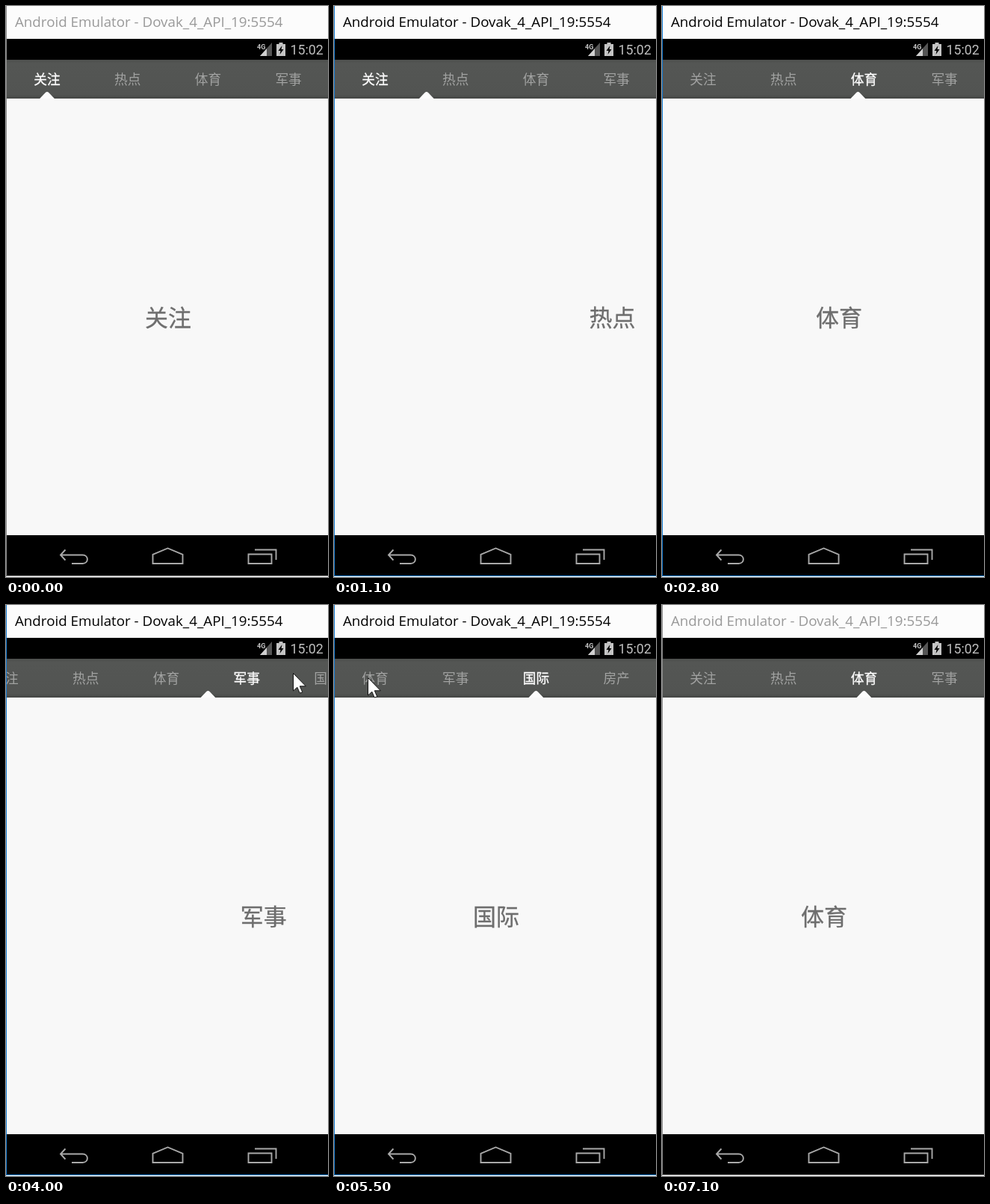
Animation, 431 px wide and 765 px high, one loop 7.2 s. Source, as an HTML page:

```html
<!DOCTYPE html>
<html lang="zh-CN">
<head>
<meta charset="utf-8">
<title>Tab pager</title>
<style>
  html, body { margin: 0; width: 100%; height: 100%; overflow: hidden; background: #f8f8f8; }
  svg { display: block; width: 431px; height: 765px; }
  #title { font: 18.75px "Open Sans", sans-serif; }
  #clock { font: 17.8px Roboto, sans-serif; fill: #bebebe; }
  #network { font: bold 9px Roboto, sans-serif; fill: #c4c4c4; }
  #pages, #tabs {
    font-family: "Noto Sans CJK SC", "Noto Sans CJK", sans-serif;
    text-anchor: middle; stroke-width: .3;
  }
  #pages { font-size: 31px; fill: #6e6e6e; stroke: #6e6e6e; }
  #tabs { font-size: 17.7px; fill: #a1a2a1; }
  #tabs .selected { fill: #fff; stroke: #fff; }
  #nav { fill: none; stroke: #a9a9a9; stroke-width: 1.9; }
</style>
</head>
<body>
<svg viewBox="0 0 431 765">
  <defs>
    <linearGradient id="barFill" x2="0" y2="1">
      <stop offset="0" stop-color="#4d4f4d"/>
      <stop offset=".1" stop-color="#545654"/>
      <stop offset=".9" stop-color="#525452"/>
      <stop offset="1" stop-color="#444644"/>
    </linearGradient>
  </defs>
  <rect width="431" height="765" fill="#f8f8f8"/>
  <rect width="431" height="44" fill="#fcfcfc"/>
  <text id="title" x="12" y="28">Android Emulator - Dovak_4_API_19:5554</text>

  <rect y="44" width="431" height="28"/>
  <path d="M340 67L356 49V67Z" fill="#555"/>
  <path d="M340 67L349 57V67Z" fill="#d0d0d0"/>
  <text id="network" x="336" y="57.500">4G</text>
  <path d="M365.500 49H370.500V51H374V67H362V51H365.500Z" fill="#c4c4c4"/>
  <path d="M369.500 53L364.500 60H367.500L366.500 65L371.500 58H368.500Z"/>
  <text id="clock" x="380.500" y="65">15:02</text>

  <g id="pages"></g>
  <rect y="72" width="431" height="52" fill="url(#barFill)"/>
  <g id="tabs"></g>
  <path id="pointer" d="M-9.800 124L-2.200 116Q0 114 2.200 116L9.800 124Z" fill="#fcfcfc"/>

  <rect y="709" width="431" height="55"/>
  <g id="nav">
    <path d="M79.500 728.500L73 735.500L79.500 742.500M73 735.500H102.500C111 735.500 111 747 102.500 747H88"/>
    <path d="M196.500 747V735L216.500 726.500L236.500 735V747Z"/>
    <path d="M324.500 734.500H355.500V747H324.500ZM333 728.500H361.500V742"/>
  </g>
  <rect y="764" width="431" height="1" fill="#fcfcfc"/>
  <path id="frame" d="M.5 0V763.500H431" fill="none"/>
  <path id="cursor" d="M.5 .5V24L5.800 19.200L9.200 27L12.800 25.800L9.300 17.800H17.300Z"
        fill="#fff" stroke="#111"/>
</svg>
<script>
const LOOP = 7200, STEP = 100, STRIP_LAG = 35;
const PAGE_WIDTH = 431, TAB_WIDTH = 107.7;
const names = ['关注', '热点', '体育', '军事', '国际', '房产'];

const easeIn = u => u * u;
const easeOut = u => 1 - (1 - u) ** 3;
const smooth = u => u * u * (3 - 2 * u);
const mix = (a, b, u) => a + (b - a) * u;
const progress = (time, start, duration) => Math.min(1, Math.max(0, (time - start) / duration));

// A finger drags the page part of the way; a settle glides it onto a whole page.
const drag = (start, to) => ({ start, to, duration: 400, ease: easeIn, lag: 0 });
const settle = (start, to, duration = 400) => ({ start, to, duration, ease: easeOut, lag: STRIP_LAG });
const moves = [
  drag(700, .639), settle(1200, 1),
  drag(2100, 1.63), settle(2600, 2),
  settle(3900, 3, 300),
  drag(4400, 3.506), settle(4800, 4),
  settle(5800, 2)
];

const glide = (start, end, from, to, hide = LOOP) => ({ start, end, from, to, hide });
const tabRight = [384, 91], tabLeft = [45, 97], edge = [418, 88];
const glides = [
  glide(200, 500, [393, 98], [288, 270], 700),
  glide(1600, 2000, [44, 330], [312, 345], 2200),
  glide(2900, 3400, [9, 300], edge),
  glide(3400, 3600, edge, tabRight),
  glide(4200, 4500, tabRight, [361, 268], 4600),
  glide(4800, 5500, [46, 297], tabLeft),
  glide(5900, 6200, tabLeft, [152, 108], 7100)
];

function pageAt(time, lagged) {
  const index = moves.findLastIndex(move => move.start <= time);
  if (index < 0) return 0;
  const { start, to, duration, ease, lag } = moves[index];
  const from = index ? moves[index - 1].to : 0;
  return mix(from, to, ease(progress(time - (lagged ? lag : 0), start, duration)));
}

function selectedAt(time) {
  const last = moves.findLast(move => move.ease === easeOut && move.start < time);
  return last ? last.to : 0;
}

function cursorAt(time) {
  const path = glides.findLast(g => g.start <= time);
  if (!path || time >= path.hide) return null;
  const u = smooth(progress(time, path.start, path.end - path.start));
  return path.from.map((value, axis) => mix(value, path.to[axis], u));
}

const el = id => document.getElementById(id);
const moveTo = (node, x, y = 0) => node.setAttribute('transform', `translate(${x} ${y})`);

function addLabels(group, spacing, x, y) {
  return names.map((name, i) => {
    const label = document.createElementNS('http://www.w3.org/2000/svg', 'text');
    label.textContent = name;
    label.setAttribute('x', x + i * spacing);
    label.setAttribute('y', y);
    return group.appendChild(label);
  });
}

const pages = el('pages'), tabs = el('tabs');
addLabels(pages, PAGE_WIDTH, 217, 428.6);
const tabLabels = addLabels(tabs, TAB_WIDTH, 55, 104.8);

function draw(time) {
  const strip = pageAt(time, true);
  const scroll = Math.max(0, strip - 2) * TAB_WIDTH;
  const selected = selectedAt(time);
  const focused = time >= 700 && time < 7100;
  const cursor = cursorAt(time);

  moveTo(pages, -pageAt(time, false) * PAGE_WIDTH);
  moveTo(tabs, -scroll);
  moveTo(el('pointer'), 55 + strip * TAB_WIDTH - scroll);
  tabLabels.forEach((label, i) => label.classList.toggle('selected', i === selected));
  el('title').setAttribute('fill', focused ? '#000' : '#999');
  el('frame').setAttribute('stroke', focused ? '#1a7fd6' : '#8f8f8f');
  el('cursor').style.display = cursor ? '' : 'none';
  if (cursor) moveTo(el('cursor'), ...cursor.map(Math.round));
}

const origin = performance.now();
function tick() {
  const time = (performance.now() - origin) % LOOP;
  draw(Math.floor(time / STEP) * STEP);
  requestAnimationFrame(tick);
}
tick();
</script>
</body>
</html>
```
